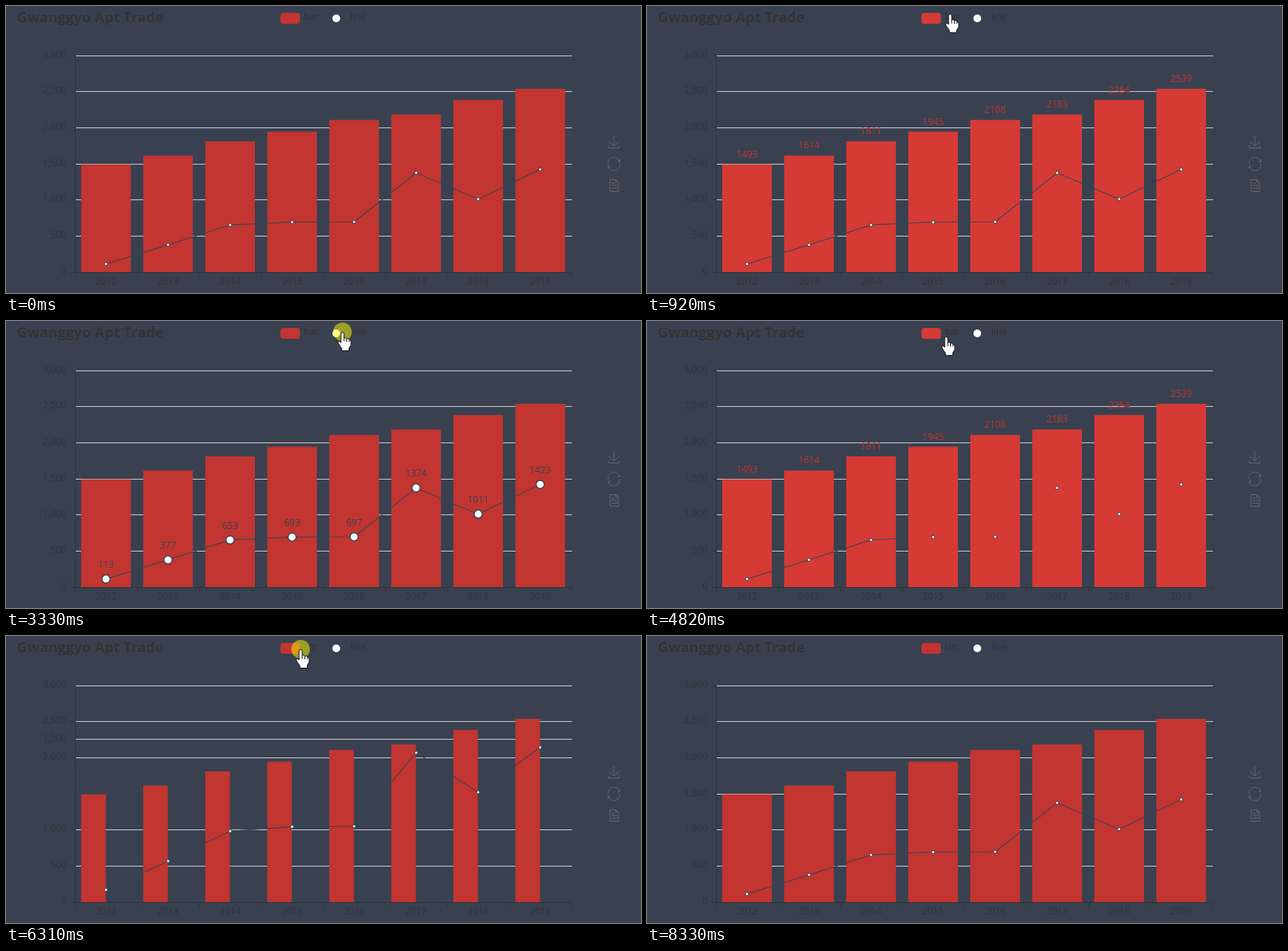
Animation of 819 by 371 pixels, one loop 9260 ms. Source, as an HTML page with a canvas:

```html
<!DOCTYPE html>
<html lang="en">
<head>
<meta charset="utf-8">
<title>Bar and line chart</title>
<style>
html, body { margin: 0; width: 819px; height: 371px; overflow: hidden; background: #394151; }
canvas { display: block; }
</style>
</head>
<body>
<canvas id="stage" width="819" height="371"></canvas>
<script>
const c = document.getElementById('stage').getContext('2d');
const LOOP = 9260, LEFT = 89, RIGHT = 729, BASE = 344, HEIGHT = 280, BAND = 80;
const BG = '#394151', INK = '#333', RED = '#c23531', BRIGHT = '#d53a35', SLATE = '#344352', OFF = '#ccc';
const FONT = '"Open Sans", "Noto Sans", sans-serif';

const bars = [1493, 1614, 1811, 1945, 2108, 2183, 2384, 2539];
const points = [113, 377, 653, 693, 697, 1374, 1011, 1423];

// pointer tip: time, x, y
const path = [
  [210, 409, 368], [600, 409, 140], [920, 391, 10], [1770, 391, 10], [2480, 434, 14],
  [4189, 434, 14], [4190, 435, 13], [4430, 435, 13], [4820, 386, 20], [5210, 380, 17],
  [7260, 380, 17], [7320, 407, 21], [7560, 570, 30], [7740, 720, 62], [7940, 787, 207],
  [8170, 787, 207], [8330, 797, 224]
];
const presses = [[3330, 3640], [4350, 4660], [5290, 5610], [6160, 6550]];
const LINE_OFF = 3400, LINE_ON = 4440, BAR_OFF = 5310, BAR_ON = 6250;

const icons = [
  'M1 7L8 13L15 7M8 0V13M1 12.5V15.5H15V12.5',
  'M13 5.5H15.5V2.5M15.3 5.5A7.5 7.5 0 0 0 .6 8.5M3.5 11H.8V14M.8 11A7.5 7.5 0 0 0 15.5 8',
  'M3 .5H10.5L14 4V15.5H3ZM10.5 .5V4H14M5 5H9M5 8H12.5M5 11.5H12.5'
].map(d => new Path2D(d));
const hand = new Path2D('M-2 2Q0 -1.5 2 2V8Q4.5 6.5 5.5 9Q8 8 8.8 10Q11 9.8 11 12.5V17L8.5 21V24.5H-1V21.5L-5.5 15Q-6.5 12 -4 12L-2 14Z');
const fingers = new Path2D('M2 8V12.5M5.5 9V13M8.8 10V13');
const arrow = new Path2D('M0 0V16L4 12.5L6.5 18.5L9 17.5L6.5 11.5H11Z');

const clamp = v => Math.min(1, Math.max(0, v));
const easeOut = v => 1 - (1 - clamp(v)) ** 3;
const mid = i => LEFT + BAND * (i + .5);

function pointer(t) {
  if (t < path[0][0] || t >= 8330) return null;
  const i = path.findIndex(k => k[0] > t);
  const [t0, x0, y0] = path[i - 1], [t1, x1, y1] = path[i];
  const f = (t - t0) / (t1 - t0);
  return { x: x0 + (x1 - x0) * f, y: y0 + (y1 - y0) * f };
}

function text(s, x, y, color, align = 'center', font = '12px ') {
  c.font = font + FONT;
  c.textAlign = align;
  c.textBaseline = 'middle';
  c.fillStyle = color;
  c.fillText(s, x, y);
}

function rect(x, y, w, h, color) {
  c.fillStyle = color;
  c.fillRect(x, y, w, h);
}

function disc(x, y, r, fill, stroke, width) {
  c.beginPath();
  c.arc(x, y, r, 0, 7);
  c.fillStyle = fill;
  c.fill();
  if (!stroke) return;
  c.strokeStyle = stroke;
  c.lineWidth = width;
  c.stroke();
}

function drawAxes(unit, barOff) {
  const max = barOff ? 1500 : 3000, step = barOff ? 300 : 500;
  for (let v = 0; v <= max; v += step) {
    // the value shared by both scales slides to its new place
    const y = Math.floor(BASE - v * (v === 1500 ? unit : HEIGHT / max) + .01);
    if (v) rect(LEFT + 1, y, RIGHT - LEFT, 1, OFF);
    rect(LEFT - 5, y, 5, 1, INK);
    text(v.toLocaleString('en-US'), 78, y - .5, INK, 'right');
  }
}

function drawBaseline() {
  rect(LEFT, 64, 1, 281, INK);
  rect(LEFT, BASE, RIGHT - LEFT + 1, 1, INK);
  for (let i = 0; i <= 8; i++) {
    rect(LEFT + i * BAND, BASE, 1, 6, INK);
    if (i < 8) text(2012 + i, mid(i), 357, INK);
  }
}

function drawLine(unit, reveal, lit) {
  const y = v => BASE - v * unit;
  c.save();
  c.beginPath();
  c.rect(LEFT, 0, (RIGHT - LEFT) * reveal, 371);
  c.clip();
  c.beginPath();
  points.forEach((v, i) => c.lineTo(mid(i), y(v)));
  c.strokeStyle = SLATE;
  c.lineWidth = 1.1;
  c.stroke();
  c.restore();
  points.forEach((v, i) => {
    disc(mid(i), y(v), lit ? 5.3 : 2, '#fff', SLATE, lit ? 1.5 : 1);
    if (lit) text(v, mid(i), y(v) - 17.5, SLATE);
  });
}

function drawLegend(barOff, lineOff, barLit) {
  text('Gwanggyo Apt Trade', 14, 16.5, INK, 'left', 'bold 18.5px ');
  c.beginPath();
  c.roundRect(354, 9, 25, 14, 3.5);
  c.fillStyle = barOff ? OFF : barLit ? BRIGHT : RED;
  c.fill();
  text('bar', 384, 15, barOff ? OFF : INK, 'left');
  disc(426, 16, 5, lineOff ? OFF : '#fff');
  text('line', 444, 15, lineOff ? OFF : INK, 'left');
}

function drawTools(p) {
  c.lineWidth = 1;
  icons.forEach((icon, i) => {
    const y = 168 + 28 * i;
    const over = p && p.x > 776 && p.x < 792 && p.y > y && p.y < y + 16;
    c.save();
    c.translate(776, y);
    c.strokeStyle = over ? '#3e98c5' : '#666';
    c.stroke(icon);
    c.restore();
  });
}

function drawPointer(p, t) {
  if (presses.some(([a, b]) => t >= a && t < b)) disc(p.x, p.y, 12, 'rgba(255,255,0,.5)');
  const onLink = p.y < 24 && p.x > 350 && p.x < 468 || p.x > 776 && p.x < 792;
  c.save();
  c.translate(Math.round(p.x), Math.round(p.y));
  c.fillStyle = '#fff';
  c.strokeStyle = '#111';
  c.lineWidth = 1;
  c.fill(onLink ? hand : arrow);
  c.stroke(onLink ? hand : arrow);
  if (onLink) c.stroke(fingers);
  c.restore();
}

function draw(t) {
  const p = pointer(t);
  const barOff = t >= BAR_OFF && t < BAR_ON;
  const lineOff = t >= LINE_OFF && t < LINE_ON;
  const gone = t < BAR_ON ? easeOut((t - BAR_OFF) / 300) : 1 - easeOut((t - BAR_ON) / 300);
  const unit = HEIGHT / 3000 * (1 + gone);
  const atLegend = p && p.y < 24;
  const barLit = atLegend && t < BAR_OFF && p.x < 406;
  const lineLit = atLegend && t < LINE_OFF && p.x > 419;

  rect(0, 0, 819, 371, BG);
  drawAxes(unit, barOff);
  bars.forEach((v, i) => {
    const h = v * HEIGHT / 3000;
    rect(mid(i) - 32, BASE - h, 64 * (1 - gone), h, barLit ? BRIGHT : RED);
  });
  drawBaseline();
  if (barLit) bars.forEach((v, i) => text(v, mid(i), BASE - v * HEIGHT / 3000 - 12, RED));
  if (!lineOff) drawLine(unit, t < LINE_OFF ? 1 : clamp((t - LINE_ON) / 1000), lineLit);
  drawLegend(barOff, lineOff, barLit);
  drawTools(p);
  if (p) drawPointer(p, t);
}

function tick() {
  draw(performance.now() % LOOP);
  requestAnimationFrame(tick);
}
tick();
</script>
</body>
</html>
```
